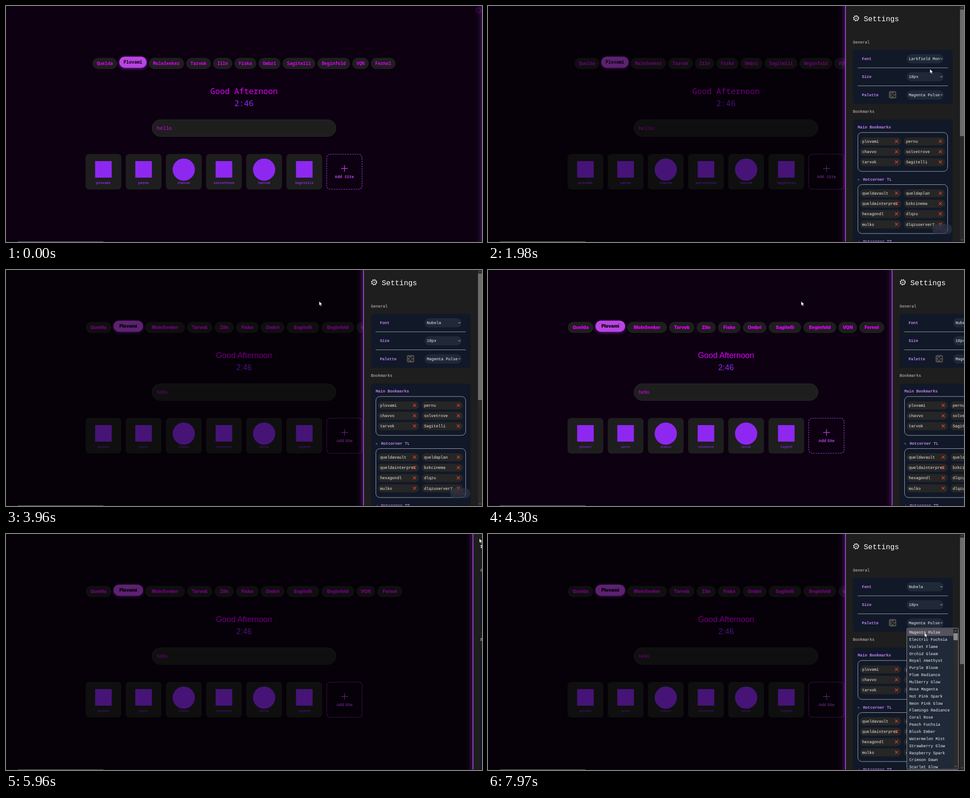
An HTML page for the animation above (8000 ms loop, 1061x528 px).

```html
<!DOCTYPE html>
<html lang="en">
<head>
<meta charset="utf-8">
<title>Start page</title>
<style>
html, body { margin: 0; width: 100%; height: 100%; overflow: hidden; background: #0c0011; }
svg { display: block; width: 100vw; height: 100vh; }
text { white-space: pre; }
.mono text { font-family: "Noto Sans Mono", "DejaVu Sans Mono", monospace; }
.sans text { font-family: "Liberation Sans", Arial, sans-serif; }
.sans .chip text { font-family: Inter, "Liberation Sans", sans-serif; font-weight: 900; }
.panel text { font-family: "Liberation Mono", "Courier New", monospace; }
.panel .arrow { font-family: "DejaVu Sans Mono", monospace; }
.b { font-weight: 700; }
.sans .label { font-weight: 400; }
.active { filter: drop-shadow(0 2px 3px rgba(160, 48, 224, .6)); }
.frame { filter: drop-shadow(0 0 5px #b428e8); }

/* One shared 8 s clock; every change is a hard cut. */
.k { animation: 8s step-end infinite; }
.mono, .early { animation-name: early; }
.sans, .late { animation-name: late; }
.mono .hot { animation-name: hotEarly; }
.sans .hot { animation-name: hotLate; }
.dim { animation-name: dim; }
.gear { animation-name: gear; }
.panel { animation-name: slide; }
.fonts { animation-name: fonts; }
.pick { animation-name: pick; }
.palettes { animation-name: palettes; }
.ring { animation-name: ring; }
.cursor { animation-name: cursor; }
.mono .over3, .mono .over4 { display: none; }
.over3 { animation-name: over3; }
.over4 { animation-name: over4; }

@keyframes early { 0% { opacity: 1 } 45.375%, 100% { opacity: 0 } }
@keyframes late { 0% { opacity: 0 } 45.375%, 100% { opacity: 1 } }
@keyframes hotEarly { 0% { opacity: 0 } 4.125% { opacity: 1 } 8.125%, 100% { opacity: 0 } }
@keyframes hotLate { 0% { opacity: 0 } 62% { opacity: 1 } 70.375%, 100% { opacity: 0 } }
@keyframes over3 { 0% { opacity: 1 } 66.25%, 100% { opacity: 0 } }
@keyframes over4 { 0% { opacity: 0 } 66.25%, 100% { opacity: 1 } }
@keyframes dim { 0% { opacity: 0 } 12.25% { opacity: 1 } 53.75% { opacity: 0 } 74.5%, 100% { opacity: 1 } }
@keyframes gear { 0% { opacity: .32 } 8.125% { opacity: 1 } 53.75% { opacity: .32 } 70.375%, 100% { opacity: 1 } }
@keyframes fonts { 0% { opacity: 0 } 28.875% { opacity: 1 } 45.375%, 100% { opacity: 0 } }
@keyframes palettes { 0% { opacity: 0 } 91.375%, 100% { opacity: 1 } }
@keyframes ring { 0% { opacity: 0 } 87% { opacity: 1 } 91.375%, 100% { opacity: 0 } }
@keyframes pick {
  0% { transform: translateY(110.95px) }
  33% { transform: translateY(0) }
  37.125%, 100% { transform: translateY(47.55px) }
}
@keyframes slide {
  0% { transform: translateX(265px) }
  12.25% { transform: translateX(259px) }
  16.5% { transform: translateX(1px) }
  20.625% { transform: translateX(0) }
  53.75% { transform: translateX(104px) }
  57.875% { transform: translateX(265px) }
  74.5% { transform: translateX(244px) }
  78.75%, 100% { transform: translateX(0) }
}
@keyframes cursor {
  0% { transform: translate(1080px, 0) }
  4.125% { transform: translate(1051px, 6px) }
  8.125% { transform: translate(1057px, 13px) }
  16.5% { transform: translate(1050px, 30px) }
  20.625% { transform: translate(989px, 132px) }
  24.75% { transform: translate(985px, 141px) }
  28.875% { transform: translate(985px, 123px) }
  33% { transform: translate(985px, 135px) }
  37.125% { transform: translate(983px, 184px) }
  41.25% { transform: translate(983px, 185px) }
  45.375% { transform: translate(979px, 184px) }
  49.5% { transform: translate(698px, 70px) }
  57.875% { transform: translate(739px, 50px) }
  62% { transform: translate(975px, 48px) }
  66.25% { transform: translate(1048px, 21px) }
  70.375% { transform: translate(1052px, 8px) }
  74.5% { transform: translate(1055px, 10px) }
  78.75% { transform: translate(1054px, 10px) }
  82.875% { transform: translate(992px, 176px) }
  87% { transform: translate(984px, 191px) }
  91.375% { transform: translate(978px, 202px) }
  95.5% { transform: translate(972px, 220px) }
  99.625%, 100% { transform: translate(973px, 221px) }
}
</style>
</head>
<body>
<svg id="stage" viewBox="0 0 1061 528" preserveAspectRatio="none"></svg>
<script>
const MAGENTA = '#e000fa', VIOLET = '#8e28f0', ORCHID = '#b944e2', CARD = '#1e1e1e', LILAC = '#c084fc';

const rect = (x, y, w, h, r, fill, more = '') =>
  `<rect x="${x}" y="${y}" width="${w}" height="${h}" rx="${r}" fill="${fill}" ${more}/>`;
const circle = (x, y, r, fill, more = '') => `<circle cx="${x}" cy="${y}" r="${r}" fill="${fill}" ${more}/>`;
const path = (d, color, width = 1, more = '') =>
  `<path d="${d}" fill="none" stroke="${color}" stroke-width="${width}" ${more}/>`;
// y is the middle of the capitals
const text = (x, y, size, fill, s, more = '') =>
  `<text x="${x}" y="${y + size * .35}" font-size="${size}" fill="${fill}" ${more}>${s}</text>`;
const mid = (x, y, size, fill, s, cls = '') =>
  text(x, y, size, fill, s, `text-anchor="middle" class="${cls}"`);
const group = (cls, body, more = '') => `<g class="${cls}" ${more}>${body}</g>`;

// A whole number of 3:2 dashes around the box
function dashed(x, y, w, h, r) {
  const around = 2 * (w + h) - (8 - 2 * Math.PI) * r;
  return rect(x, y, w, h, r, 'none', `stroke="${ORCHID}" stroke-width="1.1"
    pathLength="${5 * Math.round(around / 5.5)}" stroke-dasharray="3 2"`);
}

function gear(x, y, r, color) {
  const tooth = 2 * Math.PI * r * .87 / 16;
  return circle(x, y, r * .87, 'none', `stroke="${color}" stroke-width="${r * .24}" stroke-dasharray="${tooth}"`) +
    circle(x, y, r * .68, 'none', `stroke="${color}" stroke-width="${r * .18}"`) +
    circle(x, y, r * .18, color);
}

// Start page, once for each font
const engines = ['Quelda', 'Plovami', 'MoleSeeker', 'Tarvok', 'Ziln', 'Fisko', 'Ombri', 'Sagitelli', 'Beginfold', 'VQN', 'Fernol'];
const sites = ['plovami', 'pernu', 'chavvo', 'solvetrove', 'tarvok', 'Sagitelli'];
const sansWidths = [57, 66, 88.5, 56.5, 43, 50.5, 53, 72.5, 73.5, 41.5, 56];
const monoWidths = engines.map(s => s.length * 5.97 + 19.1);

function chips(widths) {
  const gap = 4.75;
  let x = 530.6 - (widths.reduce((a, w) => a + w + gap, -gap)) / 2;
  return engines.map((name, i) => {
    const w = widths[i], on = i === 1, y = on ? 113.2 : 116;
    const chip = rect(x, y, w, 25, 12.5, on ? ORCHID : CARD, on ? 'class="active"' : '') +
      mid(x + w / 2, y + 12.6, 9.95, on ? '#0c0011' : MAGENTA, name, 'b');
    x += w + gap;
    return group('chip', chip);
  }).join('');
}

function tiles() {
  const cards = sites.map((name, i) => {
    const x = 177.3 + 89.55 * i, cx = x + 39.85;
    const mark = i === 2 || i === 4 ? circle(cx, 366, 24.8, VIOLET) : rect(cx - 18.5, 347, 37, 37, 0, VIOLET);
    return rect(x, 331, 79.7, 79.5, 8, CARD) + mark + mid(cx, 395.5, 7.75, VIOLET, name, 'b label');
  }).join('');
  return cards + dashed(714.9, 331.5, 78.8, 78.5, 8) +
    path('M747 363.5h15M754.5 356v15', ORCHID, 1.4) + mid(754.4, 382, 8.9, ORCHID, 'Add Site', 'b');
}

function hotPanel() {
  const hover = rect(994, 16, 49.5, 47, 6, '#4c2085', 'class="active"');
  return rect(829.5, 11.5, 220, 77.5, 6, '#0c0011', `stroke="#c24cec" stroke-width="1.4" class="frame"`) +
    [0, 1, 2, 3].map(i => rect(835.5 + 53 * i, 17, 48.8, 44, 6, CARD)).join('') +
    group('k over3', rect(941.5, 16, 48.8, 46, 6, '#4c2085')) + group('k over4', hover) +
    mid(860, 39.5, 20, VIOLET, 'Ci', 'b') + mid(913, 39.5, 20, VIOLET, 'Ca', 'b') +
    rect(952, 25, 28, 28, 0, VIOLET) + mid(1019, 39, 20, VIOLET, 'Ke', 'b') +
    dashed(836, 66.5, 48, 16, 6) + mid(860, 74.5, 8.9, '#c24cec', 'Add Site', 'b');
}

const page = (cls, widths) => group('k ' + cls,
  chips(widths) +
  mid(530.6, 190.6, 17.9, MAGENTA, 'Good Afternoon') + mid(530.6, 217.6, 17.9, VIOLET, '2:46') +
  rect(325.5, 254.4, 410, 37.6, 18.8, CARD, 'stroke="#2b2d2b"') + text(336, 273.3, 11.2, MAGENTA, 'hello') +
  tiles() + group('k hot', hotPanel()));

// Settings panel
const SIZE = 8.85, PITCH = 15.85;
const chevron = (x, y, s = 1) => path(`M${x - 2.2} ${y - s}l2.2 ${2 * s}l2.2 ${-2 * s}`, '#e5e7eb', 1);

function select(y, value) {
  return rect(933, y - 10.3, 82.5, 20.8, 10.4, '#1f2937') +
    `<g clip-path="url(#fit)">${value}</g>` + chevron(1010.6, y, 1.1);
}
const option = (y, s) => text(938, y, SIZE, '#f3f4f6', s);

function links(names, top) {
  return names.map((name, i) => {
    const x = 829 + i % 2 * 97.7, y = top + (i >> 1) * 23.2;
    return rect(x, y - 9, 92, 18, 9, '#262626') + text(x + 5, y, SIZE, '#eee', name) +
      path(`M${x + 78.3} ${y - 3.6}l6.6 6.6m0 -6.6l-6.6 6.6`, '#e8432a', 1.3);
  }).join('');
}
const outline = (y, h) => rect(824.5, y, 200, h, 9, 'none', 'stroke="#a3a8b3"');
const corner = (y, arrow, name) => text(823.5, y, 9, LILAC, arrow, 'class="arrow"') +
  text(836, y, SIZE, LILAC, name, 'class="b"');
const rowLabel = (y, s) => text(833.5, y, SIZE, LILAC, s, 'class="b"');

const fontNames = ['Alderton', 'Brimwick Sans', 'Calloway', 'Nubela', 'Dunmarrow', 'Elsworthy Serif', 'Fennimoor',
  'Larkfield Mono', 'Garrowby', 'Hollinside Slab', 'Ivenholt', 'Jessamund', 'Kestermere', 'Lowrick Condensed',
  'Marlinhow', 'Netherby Typewriter X', 'Orrindale', 'Pellworth', 'Quenby Rounded', 'Rosthwick', 'Silverhow',
  'Tamsworth', 'Ullerdale', 'Wexmoor Hand'];
const paletteNames = ['Magenta Pulse', 'Electric Fuchsia', 'Violet Flame', 'Orchid Gleam', 'Royal Amethyst',
  'Purple Bloom', 'Plum Radiance', 'Mulberry Glow', 'Rose Magenta', 'Hot Pink Spark', 'Neon Pink Glow',
  'Flamingo Radiance', 'Coral Rose', 'Peach Fuchsia', 'Blush Ember', 'Watermelon Mist', 'Strawberry Glow',
  'Raspberry Spark', 'Crimson Dawn', 'Scarlet Glow'];

function list(x, y, w, h, barWidth, names, barClass) {
  return rect(x + .5, y + .5, w - 1, h - 1, 2, '#1f2937', 'stroke="#8b8f98"') +
    group(barClass, rect(x + 2, y + 2, barWidth, PITCH, 0, '#56535e')) +
    names.map((s, i) => text(x + 6, y + 10 + PITCH * i, SIZE, '#f3f4f6', s)).join('');
}

const settings = group('k panel',
  rect(780, 0, 16, 528, 0, 'url(#glow)') + rect(796, 0, 265, 528, 0, CARD) + rect(796, 0, 1.7, 528, 0, '#b04be4') +
  gear(820.5, 27.5, 6.8, '#fff') + text(837.5, 28, 16.4, '#fff', 'Settings') +
  text(813.5, 80.5, SIZE, '#ccc', 'General') + rect(813.5, 98, 222, 121, 6, '#111827') +
  path('M824 138.3h201M824 178.6h201', '#9ca3af') +
  rowLabel(118, 'Font') + rowLabel(158, 'Size') + rowLabel(198.5, 'Palette') +
  select(118, group('k early', option(118, 'Larkfield Mono')) + group('k late', option(118, 'Nubela'))) +
  select(158.3, option(158.3, '18px')) + select(198.7, option(198.7, 'Magenta Pulse')) +
  rect(893.5, 190.3, 16.6, 16.8, 4, '#4b4b4b') +
  path('M896.5 195.5h2.5l5 6.4h3M896.5 201.9h2.5l5 -6.4h3M905.4 193.5l2 2l-2 2M905.4 199.9l2 2l-2 2', '#111', 1.3) +
  text(813.5, 236.3, SIZE, '#ccc', 'Bookmarks') + rect(813.5, 254, 222, 290, 6, '#111827') +
  text(824, 271.3, SIZE, LILAC, 'Main Bookmarks', 'class="b"') + outline(283, 87) + links(sites, 303) +
  corner(387.5, '↖', 'Hotcorner TL') + outline(399.5, 109.5) +
  links(['queldavault', 'queldaplan', 'queldainterpret', 'bzkcinema', 'hexagondl', 'dlqzu', 'mulko', 'dlqzuserver7'], 419) +
  corner(526.5, '↗', 'Hotcorner TR') +
  group('', rect(990, 488, 44.5, 22.5, 11.2, '#2b3a4f') + mid(1012.3, 499.5, 9.3, '#a02525', 'Close', 'b'), 'opacity=".62"') +
  rect(1052, 0, 9, 528, 0, '#2a2a2a') + rect(1052, 8, 9, 283, 0, '#6b6b6b') +
  path('M1054.3 5l2.2 -2l2.2 2', '#888') + path('M1054.3 522l2.2 2l2.2 -2', '#888') +
  group('k fonts', list(929, 130, 131, 385, 127, fontNames, 'k pick')) +
  group('k palettes', list(933, 210, 116, 317, 102, paletteNames, '') +
    rect(1037, 211, 11, 315, 0, '#2b2b2b') + rect(1037.5, 222, 9.5, 15.5, 0, '#8a8a8a') +
    path('M1040 218l2.2 -2l2.2 2M1040 519l2.2 2l2.2 -2', '#999')));

document.getElementById('stage').innerHTML =
  `<defs>
    <linearGradient id="glow"><stop offset="0" stop-color="#a040e0" stop-opacity="0"/>
      <stop offset=".5" stop-color="#a040e0" stop-opacity=".06"/>
      <stop offset="1" stop-color="#a040e0" stop-opacity=".27"/></linearGradient>
    <clipPath id="fit"><rect x="936" y="100" width="70.5" height="110"/></clipPath>
  </defs>` +
  rect(0, 0, 1061, 528, 0, '#0c0011') +
  group('k gear', gear(1053, 10, 7, '#b400d8')) +
  page('mono', monoWidths) + page('sans', sansWidths) +
  group('k dim', rect(0, 0, 1061, 528, 0, '#000', 'fill-opacity=".5"')) +
  settings +
  rect(0, 527, 1061, 1, 0, '#17121a') + rect(26, 526.6, 191, 1.4, 0, '#5c5660') +
  group('k ring', circle(984, 192, 6.6, '#b0a010', 'opacity=".85"')) +
  group('k cursor', '<path d="M0 0V9.6L2.2 7.6L3.8 11.2L5.4 10.5L3.9 7H7Z" fill="#fff" stroke="#111" stroke-width=".6"/>');
</script>
</body>
</html>
```
